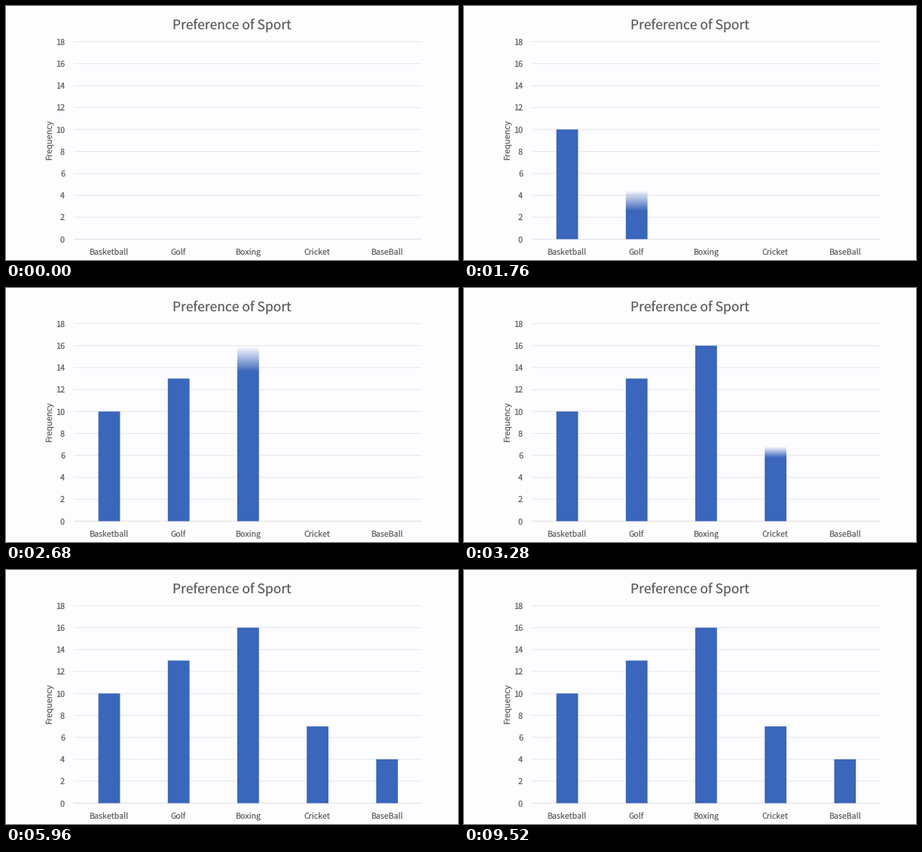
Recreate the animation shown at these times as a matplotlib script. Size 600 by 338 pixels, loop 9960 ms.

```python
import matplotlib.pyplot as plt
import numpy as np
from matplotlib.animation import FuncAnimation
from matplotlib.colors import to_rgb

W, H, DPI = 600, 338, 100
STEP, FRAMES = 40, 249
BG, BLUE, INK, GRID = "#fdfcfe", "#3a66bb", "#626164", "#e6e5e9"

LEFT, RIGHT, BASE, UNIT = 90, 552, 310.3, 14.6
BAR_X, BAR_GAP, BAR_W = 122.6, 92.2, 28.8
WIPE_MS = 500
SOFT = 1 / 7  # soft edge as a share of the bar height

# label, value, start of the wipe in ms
SPORTS = [
    ("Basketball", 10, 990),
    ("Golf", 13, 1610),
    ("Boxing", 16, 2245),
    ("Cricket", 7, 2855),
    ("BaseBall", 4, 3585),
]

plt.rcParams["font.family"] = "Noto Sans CJK JP"
plt.rcParams["text.hinting"] = "none"

fig = plt.figure(figsize=(W / DPI, H / DPI), dpi=DPI, facecolor=BG)
ax = fig.add_axes([0, 0, 1, 1])
ax.axis("off")


def y_of(value):
    return BASE - value * UNIT


def label(x, y, text, px, color=INK, **kw):
    kw = {"ha": "center", "va": "baseline", **kw}
    ax.text(x, y, text, fontsize=px * 72 / DPI, color=color, **kw)


def coverage(lo, hi):
    """Whole-pixel span around lo..hi and how much of each pixel it fills."""
    a, b = int(np.floor(lo)), int(np.ceil(hi))
    px = np.arange(a, b)
    return a, b, np.minimum(px + 1, hi) - np.maximum(px, lo)


class Bar:
    def __init__(self, i, value, start):
        x = BAR_X + i * BAR_GAP
        x0, x1, across = coverage(x, x + BAR_W)
        y0, y1, down = coverage(y_of(value), BASE)
        self.start = start
        self.mask = np.outer(down, across)
        self.height = (BASE - np.arange(y0, y1) - 0.5) / (value * UNIT)
        self.rgba = np.zeros(self.mask.shape + (4,))
        self.rgba[..., :3] = to_rgb(BLUE)
        self.image = ax.imshow(self.rgba, extent=(x0, x1, y1, y0), aspect="auto",
                               interpolation="nearest", zorder=3)

    def update(self, t):
        progress = np.clip((t - self.start) / WIPE_MS, 0, 1)
        front = progress * (1 + SOFT)
        shown = np.clip((front - self.height) / SOFT, 0, 1)
        self.rgba[..., 3] = self.mask * shown[:, None]
        self.image.set_data(self.rgba.copy())


label(299.8, 31, "Preference of Sport", 17.45, color="#5c5b5e")
label(60.9, 177.8, "Frequency", 10.9, rotation=90, rotation_mode="anchor")

for v in range(0, 19, 2):
    y = y_of(v)
    ax.plot([LEFT, RIGHT], [y, y], color=GRID if v else "#dfdee2",
            lw=72 / DPI, solid_capstyle="butt", snap=False, zorder=1)
    label(78.1, y + 4.2, str(v), 10.9, ha="right")

bars = []
for i, (name, value, start) in enumerate(SPORTS):
    label(135.9 + i * 92.35, 331, name, 10.6)
    bars.append(Bar(i, value, start))

ax.set_xlim(0, W)
ax.set_ylim(H, 0)


def draw(frame):
    for bar in bars:
        bar.update(frame * STEP)
    return [bar.image for bar in bars]


anim = FuncAnimation(fig, draw, frames=FRAMES, interval=STEP,
                     repeat=True, repeat_delay=0, blit=False)
plt.show()
```
